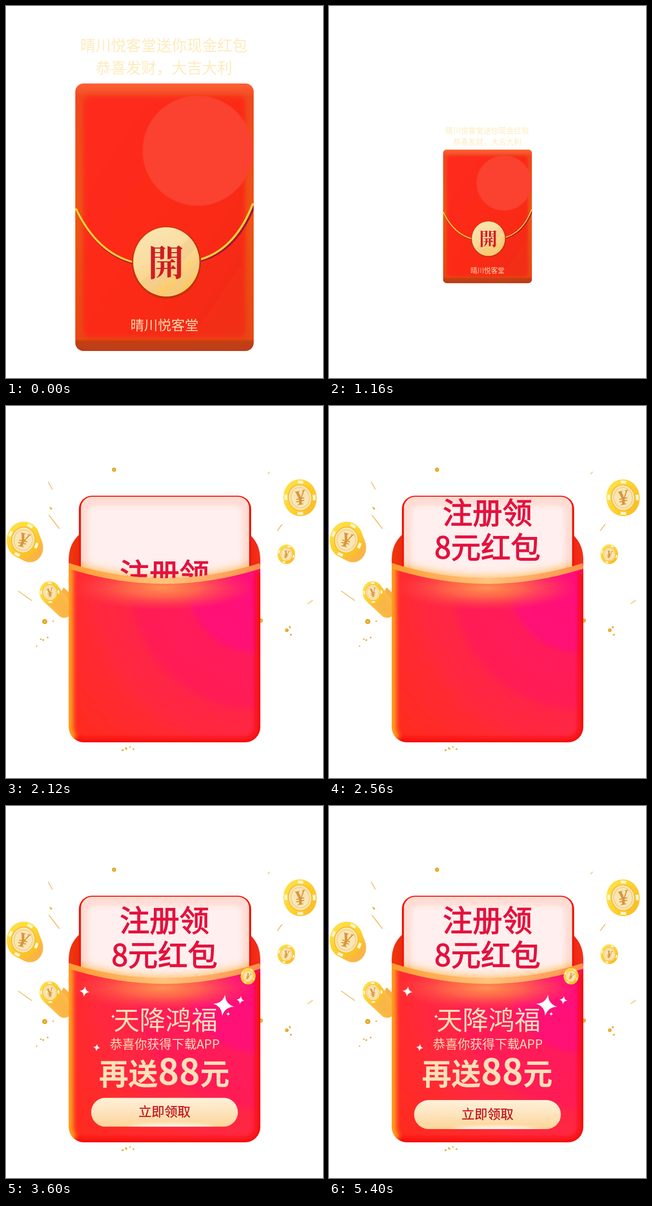
An HTML page for the animation above (5760 ms loop, 622x730 px).

```html
<!DOCTYPE html>
<html lang="zh-CN">
<head>
<meta charset="utf-8">
<title>红包</title>
<style>
html, body { margin: 0; width: 100%; height: 100%; overflow: hidden; background: #fff; }
svg { display: block; width: 622px; height: 730px; }
text { font-family: "Noto Sans CJK SC", "Noto Sans CJK", "Noto Sans", sans-serif; text-anchor: middle; }
.serif { font-family: "Noto Serif CJK SC", "Noto Serif CJK", "Noto Sans CJK SC", serif; font-weight: 900; }
.yuan { font-family: "Liberation Serif", serif; font-weight: bold; font-style: italic; }
#closed, #open, #debris { transform-origin: 311px 411px; }
#seal { transform-origin: 314.5px 503px; }
#offer { transform-origin: 317px 435px; }
#button { transform-origin: 311px 605px; }
</style>
</head>
<body>
<svg viewBox="0 0 622 730">
<defs>
  <filter id="soft4" x="-20%" y="-20%" width="140%" height="140%"><feGaussianBlur stdDeviation="4"/></filter>
  <filter id="soft9" x="-30%" y="-60%" width="160%" height="220%"><feGaussianBlur stdDeviation="9"/></filter>
  <linearGradient id="frame" x2="0" y2="1">
    <stop offset="0" stop-color="#ff6238"/><stop offset=".05" stop-color="#f0491f"/>
    <stop offset=".5" stop-color="#ee5514"/><stop offset=".955" stop-color="#ea4714"/>
    <stop offset=".965" stop-color="#c24012"/><stop offset="1" stop-color="#bd3c1a"/>
  </linearGradient>
  <linearGradient id="face" x2="1" y2="1">
    <stop offset="0" stop-color="#ff2b1d"/><stop offset=".6" stop-color="#fb2917"/><stop offset="1" stop-color="#f02f16"/>
  </linearGradient>
  <linearGradient id="sealFill" x2=".45" y2="1">
    <stop offset="0" stop-color="#f8e6b6"/><stop offset=".5" stop-color="#fbdda0"/><stop offset="1" stop-color="#fcc966"/>
  </linearGradient>
  <radialGradient id="pocketFill" gradientUnits="userSpaceOnUse" cx="490" cy="350" r="470">
    <stop offset="0" stop-color="#ff0e7c"/><stop offset=".27" stop-color="#ff1174"/>
    <stop offset=".3" stop-color="#ff1b5a"/><stop offset=".5" stop-color="#ff1c54"/>
    <stop offset=".54" stop-color="#ff2546"/><stop offset=".66" stop-color="#ff283e"/>
    <stop offset=".72" stop-color="#ff2a32"/><stop offset="1" stop-color="#ff2b1c"/>
  </radialGradient>
  <radialGradient id="glow">
    <stop offset="0" stop-color="#ff9150"/><stop offset=".4" stop-color="#ff7048" stop-opacity=".85"/>
    <stop offset="1" stop-color="#ff4a48" stop-opacity="0"/>
  </radialGradient>
  <linearGradient id="backFill" x2="1">
    <stop offset="0" stop-color="#f0380f"/><stop offset=".12" stop-color="#e51a08"/>
    <stop offset=".88" stop-color="#e51a08"/><stop offset="1" stop-color="#f5301a"/>
  </linearGradient>
  <linearGradient id="rim" x2="1">
    <stop offset="0" stop-color="#ff9a30"/><stop offset=".5" stop-color="#ffc47c"/><stop offset="1" stop-color="#ff8f48"/>
  </linearGradient>
  <linearGradient id="buttonFill" x2="0" y2="1">
    <stop offset="0" stop-color="#fff0d8"/><stop offset=".45" stop-color="#fde5c0"/><stop offset="1" stop-color="#fdd596"/>
  </linearGradient>
  <linearGradient id="gold" x2="1" y2="1">
    <stop offset="0" stop-color="#ffe650"/><stop offset=".5" stop-color="#ffd22c"/><stop offset="1" stop-color="#f8b524"/>
  </linearGradient>
  <linearGradient id="trail" x2="1" y2="1">
    <stop offset="0" stop-color="#ffd84a"/><stop offset="1" stop-color="#f8ae44"/>
  </linearGradient>
  <clipPath id="closedClip"><rect x="136" y="152" width="350" height="525" rx="16"/></clipPath>
  <clipPath id="sealClip"><ellipse cx="314.5" cy="502" rx="64" ry="67"/></clipPath>
  <path id="pocketShape" d="M123 308Q311 368 499 308V630A30 30 0 0 1 469 660H153A30 30 0 0 1 123 630Z"/>
  <clipPath id="pocketClip"><use href="#pocketShape"/></clipPath>
  <clipPath id="cardClip"><rect x="147" y="178" width="330" height="200" rx="22"/></clipPath>
  <clipPath id="aboveClip"><path d="M123 150H499V308Q311 368 123 308Z"/></clipPath>
  <clipPath id="buttonClip"><rect x="167" y="577" width="288" height="57" rx="28.5"/></clipPath>
</defs>

<g id="closed">
  <g fill="#fdebbd" font-size="29.8" font-weight="300">
    <text x="310" y="88">晴川悦客堂送你现金红包</text>
    <text x="310" y="132">恭喜发财，大吉大利</text>
  </g>
  <g clip-path="url(#closedClip)">
    <rect x="136" y="152" width="350" height="525" fill="url(#frame)"/>
    <rect x="151" y="177" width="319" height="474" rx="14" fill="url(#face)" filter="url(#soft4)"/>
    <circle cx="376" cy="284" r="108" fill="#fb4130"/>
    <g fill="none" stroke-linecap="round" stroke-width="4">
      <path d="M140 402Q181 488 251 505M381 500Q452 482 487 393" stroke="#a8123c"/>
      <path d="M138 399Q179 485 251 503M379 498Q449 479 484 389" stroke="#fdd432"/>
    </g>
  </g>
  <g id="seal">
    <ellipse cx="315" cy="503.5" rx="68" ry="71" fill="#c9300f"/>
    <ellipse cx="314.5" cy="502" rx="65" ry="68" fill="#f6d877"/>
    <g clip-path="url(#sealClip)">
      <ellipse cx="314.5" cy="502" rx="64" ry="67" fill="url(#sealFill)"/>
      <path d="M255 550L372 445L385 462L280 572ZM310 570L385 492V505L325 572Z" fill="#f2cb90" opacity=".6"/>
    </g>
    <text class="serif" x="314" y="529" font-size="71" fill="#cf1c25">開</text>
  </g>
  <text x="311" y="636" font-size="26.7" fill="#fbdcae">晴川悦客堂</text>
</g>

<g id="debris"></g>

<g id="open">
  <path d="M123 320V304C123 278 131 264 146 250H476C491 264 499 278 499 304V340H123Z" fill="url(#backFill)"/>
  <rect x="143" y="176" width="338" height="190" rx="26" fill="#f0180c"/>
  <g clip-path="url(#cardClip)">
    <rect x="147" y="178" width="330" height="200" fill="#ffdcd3"/>
    <rect x="161" y="196" width="302" height="190" rx="14" fill="#ffefee" filter="url(#soft4)"/>
    <path d="M123 306Q311 366 499 306V380H123Z" fill="#ffb84e" filter="url(#soft9)"/>
  </g>
  <g clip-path="url(#aboveClip)">
    <g id="cardText" font-size="58.5" fill="#e4123e" stroke="#e4123e" stroke-width="1.5">
      <text x="311" y="246">注册领</text>
      <text x="311" y="314">8元红包</text>
    </g>
  </g>
  <g clip-path="url(#pocketClip)">
    <use href="#pocketShape" fill="url(#pocketFill)"/>
    <ellipse cx="308" cy="357" rx="180" ry="44" fill="url(#glow)"/>
    <g fill="none" filter="url(#soft4)">
      <path d="M499 325V630A30 30 0 0 1 469 660H153A30 30 0 0 1 123 630" stroke="#f80f0c" stroke-width="18"/>
      <path d="M124 300V630Q124 645 132 652" stroke="#ffa01c" stroke-width="16"/>
    </g>
    <path d="M123 313.5Q311 373.500 499 313.5" fill="none" stroke="url(#rim)" stroke-width="11"/>
  </g>
  <g id="offer" fill="#fee0b8">
    <text x="313" y="439" font-size="51" font-weight="300">天降鸿福</text>
    <text x="311.5" y="476" font-size="24.3">恭喜你获得下载APP</text>
    <text x="310.5" y="547" font-size="58" font-weight="700">再送<tspan font-size="70">88</tspan>元</text>
    <g id="stars" fill="#fff"></g>
  </g>
  <g clip-path="url(#pocketClip)">
    <g id="button">
      <rect x="167" y="577" width="288" height="57" rx="28.5" fill="url(#buttonFill)"/>
      <g clip-path="url(#buttonClip)">
        <ellipse cx="325" cy="638" rx="85" ry="9" fill="#fff" filter="url(#soft4)"/>
      </g>
      <text x="311" y="614" font-size="25.5" fill="#c2161d" stroke="#c2161d" stroke-width=".4">立即领取</text>
    </g>
  </g>
</g>
</svg>
<script>
const LOOP = 5760, STEP = 40;
const $ = id => document.getElementById(id);
const add = (id, markup) => $(id).insertAdjacentHTML('beforeend', markup);
const repeat = (n, make) => Array.from({ length: n }, (_, i) => make(i)).join('');

let seed = 7;
const random = () => (seed = seed * 16807 % 2147483647) / 2147483647;

// Gold coin of radius r; depth is how far its body extends down and right.
function coin(x, y, r, tilt, depth) {
  const ring = (k, attrs) => `<ellipse rx="${r * .9 * k}" ry="${r * k}" ${attrs}/>`;
  const layer = i => {
    const k = 1 - i / 12;
    return `<g transform="translate(${x + depth * k} ${y + depth * 1.15 * k})">${ring(1 - k / 5, 'fill="url(#trail)"')}</g>`;
  };
  return repeat(13, layer) + `<g transform="translate(${x} ${y}) rotate(${tilt})">
    ${ring(1, 'fill="url(#gold)"')}
    ${ring(.86, `fill="none" stroke="#fff6c8" stroke-width="${r * .16}" stroke-dasharray="${r * .3} ${r}"`)}
    ${ring(.74, 'fill="#f3bd35"')}${ring(.68, 'fill="#fae6b4"')}
    ${ring(.56, `fill="none" stroke="#f2cf88" stroke-width="${r * .05}"`)}
    <text class="yuan" y="${r * .38}" font-size="${r * 1.15}" fill="#d9963c">¥</text></g>`;
}

const dot = (x, y, r) =>
  `<circle cx="${x}" cy="${y}" r="${r}" fill="#e2a420"/><circle cx="${x}" cy="${y}" r="${r * .4}" fill="#f6c84e"/>`;
const speck = (x, y, w, h) => dot(x + random() * w, y + random() * h, 1 + random());

add('debris',
  dot(212, 125, 4) + dot(76, 423, 5) + dot(551, 440, 3.5) + dot(500, 421, 4) +
  repeat(5, () => speck(60, 405, 40, 72)) +
  repeat(5, () => speck(193, 668, 62, 8)) +
  repeat(2, () => speck(70, 198, 50, 10)) +
  repeat(2, () => speck(550, 424, 16, 34)) +
  `<path d="M83 149L91 164M84 214L105 241M24 363L51 382M542 232L532 245M517 129L514 134M602 381L592 388"
    stroke="#eeb044" stroke-width="1.4"/>
  <path d="M100 380L113 356L128 370V416L102 392Z" fill="#f9b044"/>` +
  coin(34, 263, 36, 12, 13) + coin(86, 366, 22, -15, 28) +
  coin(577, 180, 36, -12, 3) + coin(550, 291, 19, 5, 1));

const star = (x, y, r) =>
  `<path transform="translate(${x} ${y}) rotate(8) scale(${r})" d="M0-1Q.14-.14 1 0Q.14.14 0 1Q-.14.14-1 0Q-.14-.14 0-1"/>`;
add('stars', star(154, 364, 10) + star(427, 391, 21) + star(460, 381, 8) +
  star(178, 474, 7) + star(210, 413, 4) + star(436, 408, 4));
add('offer', coin(475, 334, 16, 15, 2));

const progress = (t, start, end) => Math.min(1, Math.max(0, (t - start) / (end - start)));
const grow = (start, end) => t => `scale(${progress(t, start, end)})`;
const shrink = (start, end) => t => `scale(${1 - progress(t, start, end)})`;

// Springs from below to rest: crosses zero three times, ending at the third.
function spring(t, start, end, distance) {
  const u = progress(t, start, end);
  if (u === 0) return distance * 1.5;
  if (u === 1) return 0;
  const phase = 3 * Math.PI * u;
  return distance * Math.exp(-u) * Math.sin(phase) / phase;
}

// Three half swings of a triangle wave.
const wobble = t =>
  4.5 * 2 / Math.PI * Math.asin(Math.sin(3 * Math.PI * progress(t, 4080, 5400)));

function play(id, pose) {
  const count = LOOP / STEP;
  const frames = Array.from({ length: count + 1 }, (_, i) => ({
    transform: pose(Math.min(i, count - 1) * STEP), offset: i / count, easing: 'steps(1, end)'
  }));
  $(id).animate(frames, { duration: LOOP, iterations: Infinity });
}

play('closed', shrink(1000, 1320));
play('seal', t => `scaleX(${Math.cos(2 * Math.PI * progress(t, 40, 680)).toFixed(4)})`);
play('open', grow(1440, 1760));
play('debris', grow(1840, 2040));
play('cardText', t => `translateY(${spring(t, 2040, 3240, 120).toFixed(2)}px)`);
play('offer', grow(3040, 3240));
play('button', t => `translateY(${spring(t, 3240, 3840, 80).toFixed(2)}px) rotate(${wobble(t).toFixed(3)}deg)`);
</script>
</body>
</html>
```
